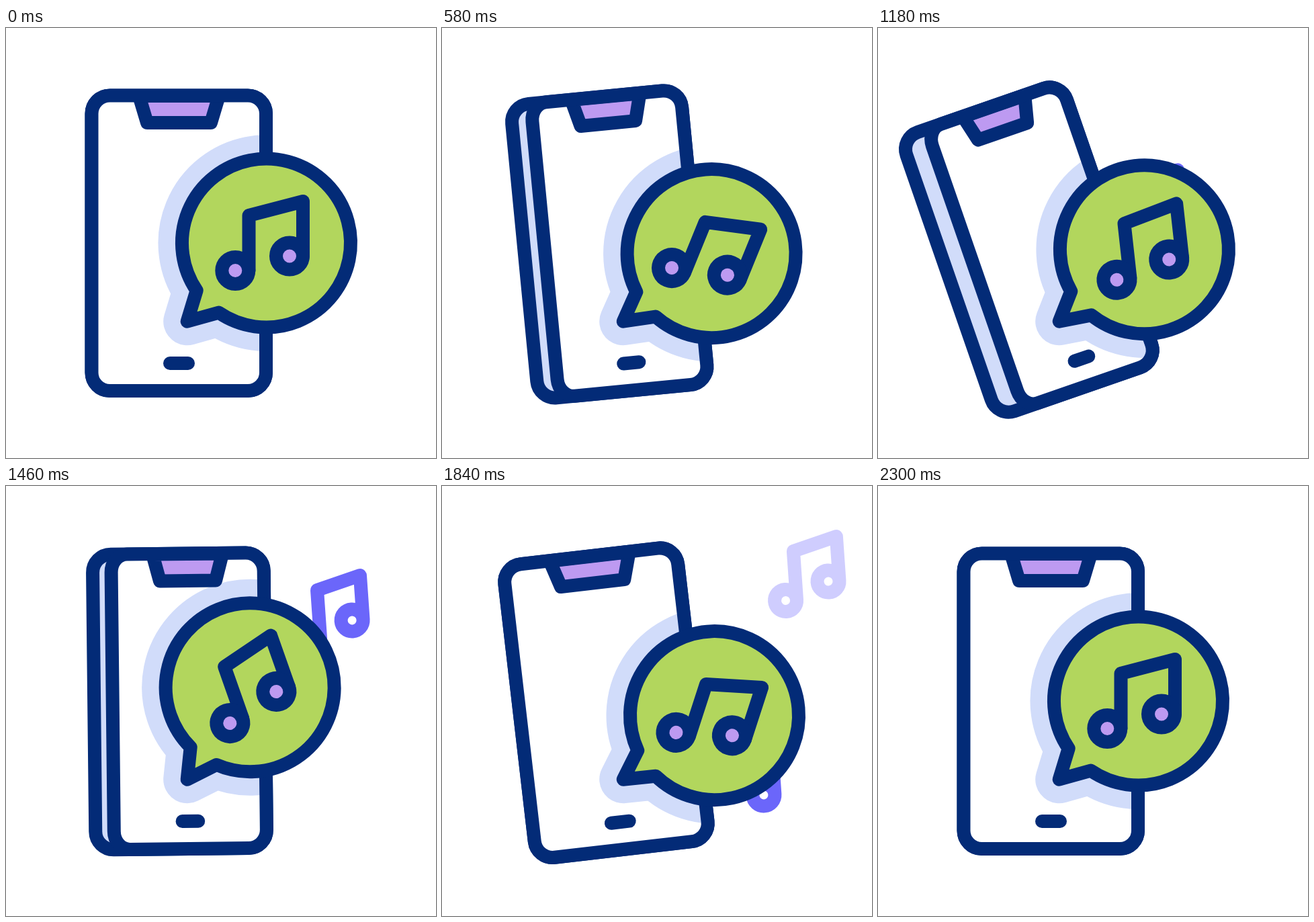
An HTML page with a canvas for the animation above (2400 ms loop, 640 by 640 pixels).

```html
<!DOCTYPE html>
<html lang="en">
<head>
<meta charset="utf-8">
<title>Phone music</title>
<style>
  html, body { margin: 0; width: 100%; height: 100%; overflow: hidden; background: #fff; }
  canvas { display: block; width: 640px; height: 640px; }
</style>
</head>
<body>
<canvas id="stage" width="640" height="640"></canvas>
<script>
const ctx = document.getElementById('stage').getContext('2d');
const LOOP = 2400;
const NAVY = '#032b77', PALE = '#d1dcfa', GREEN = '#b2d65d', LILAC = '#bd9af1', VIOLET = '#6b66fa';
const PHONE_PIVOT = [272, 432], TAIL_TIP = [269.7, 436.7], NOTE_PIVOT = [383, 318];

const clamp = u => Math.min(1, Math.max(0, u));
const smooth = u => u * u * (3 - 2 * u);

// Smooth motion through a few [time, value] poses, resting at each turning point.
function track(...keys) {
  const last = keys.length - 1;
  const slope = i => (keys[i + 1][1] - keys[i][1]) / (keys[i + 1][0] - keys[i][0]);
  const speed = i => {
    if (i === 0 || i === last) return 0;
    const a = slope(i - 1), b = slope(i);
    return a * b > 0 ? 2 * a * b / (a + b) : 0;
  };
  return t => {
    let i = 0;
    while (i < last - 1 && t > keys[i + 1][0]) i++;
    const [t0, v0] = keys[i], [t1, v1] = keys[i + 1];
    const h = t1 - t0, u = clamp((t - t0) / h), w = 1 - u;
    return v0 + (v1 - v0) * smooth(u) + h * u * w * (speed(i) * w - speed(i + 1) * u);
  };
}

const phoneTilt = track([200, 0], [860, 11.9], [1220, 19.3], [1490, 0], [2030, 9.2], [2300, 0]);
const bubbleTilt = track([200, 0], [860, 16.3], [940, 19.6], [1430, -11.2], [1940, 12], [2300, 0]);
const noteTilt = track([200, 0], [820, 22.5], [1260, -14], [1880, 8.5], [2300, 0]);
const depth = track([200, 0], [740, 46], [1240, 48], [1820, 0]);

const bubble = new Path2D('M283.7 390.6A125.5 125.5 0 1 1 316.6 423.6L269.7 436.7Z');
const stems = new Path2D('M361.5 361V279L442 258V340');

function ring(path, x, y, r) {
  path.moveTo(x + r, y);
  path.arc(x, y, r, 0, Math.PI * 2);
  return path;
}

const pair = {
  start: 1060, time: 700, x: 422, y: 290, dx: 153, dy: -148,
  shape: ring(ring(new Path2D('M-48.8 24V-48.5L16.5 -66V0'), 0, 0, 16.5), -65.3, 24, 16.5)
};
const single = {
  start: 1600, time: 510, x: 400, y: 381, dx: 172, dy: 172,
  shape: ring(new Path2D('M16.5 0V-66L28 -52'), 0, 0, 16.5)
};

function turn([x, y], deg) {
  ctx.translate(x, y);
  ctx.rotate(deg * Math.PI / 180);
  ctx.translate(-x, -y);
}

function group(draw) {
  ctx.save();
  draw();
  ctx.restore();
}

function paint(path, fill, stroke, width = 20) {
  if (fill) { ctx.fillStyle = fill; ctx.fill(path); }
  if (stroke) { ctx.strokeStyle = stroke; ctx.lineWidth = width; ctx.stroke(path); }
}

function body(left, rx) {
  const path = new Path2D(), l = { x: rx, y: 27 };
  path.roundRect(left, 100.5, 387 - left, 439.5, [l, 27, 27, l]);
  return path;
}

function flyingNote({ start, time, x, y, dx, dy, shape }, t) {
  if (t < start) return;
  const p = smooth(clamp((t - start) / time));
  group(() => {
    ctx.globalAlpha = clamp(1 - (t - start - time) / 120);
    ctx.translate(x + dx * p, y + dy * p);
    turn([0, 0], -4);
    paint(shape, null, VIOLET);
  });
}

function phone(t) {
  const d = depth(t), tilt = -phoneTilt(t);
  const scale = 1 - d / 259.5;
  const fx = x => 387 - (387 - x) * scale;
  const face = body(127.5 + d, 27 * scale);

  group(() => {
    turn(PHONE_PIVOT, tilt);
    paint(body(127.5 + d * .15, 27), PALE, NAVY);
    paint(face, '#fff');
    group(() => {
      ctx.clip(face);
      turn(PHONE_PIVOT, -tilt);
      turn(TAIL_TIP, bubbleTilt(t));
      paint(bubble, PALE, PALE, 71);
    });
    paint(new Path2D(`M${fx(198)} 101L${fx(210)} 141H${fx(305)}L${fx(317)} 101Z`), LILAC, NAVY);
    paint(face, null, NAVY);
    paint(new Path2D(`M${fx(244)} 499H${fx(271)}`), null, NAVY);
  });
}

function speech(t) {
  group(() => {
    turn(TAIL_TIP, bubbleTilt(t));
    paint(bubble, GREEN, NAVY);
    turn(NOTE_PIVOT, noteTilt(t));
    paint(stems, null, NAVY);
    paint(ring(ring(new Path2D(), 341.3, 361, 20), 422, 339.5, 20), LILAC, NAVY);
  });
}

function frame(t) {
  ctx.clearRect(0, 0, 640, 640);
  ctx.lineJoin = ctx.lineCap = 'round';
  flyingNote(pair, t);
  flyingNote(single, t);
  phone(t);
  speech(t);
}

const began = performance.now();
function tick() {
  frame((performance.now() - began) % LOOP);
  requestAnimationFrame(tick);
}
tick();
</script>
</body>
</html>
```
